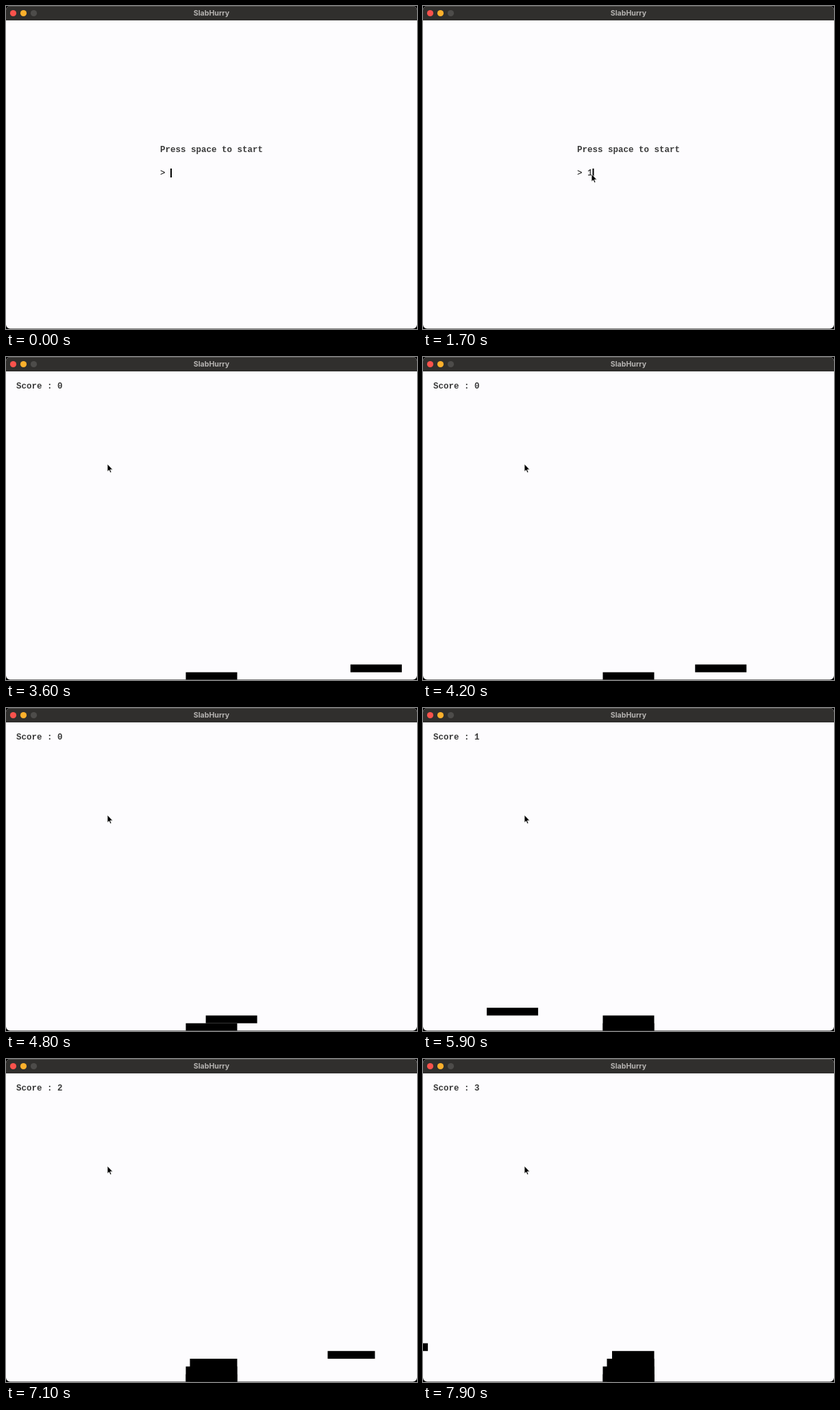
Animation, 600 px wide and 471 px high, one loop 8 s. Source, as an HTML page:

```html
<!DOCTYPE html>
<html lang="en">
<head>
<meta charset="utf-8">
<title>SlabHurry</title>
<style>
  html, body { margin: 0; width: 100%; height: 100%; overflow: hidden; background: #000; }
  svg { display: block; width: 600px; height: 471px; }
  text { white-space: pre; }
  .mono { font: 12.5px "Liberation Mono", "Courier New", monospace; }
  .bold { font-weight: 700; fill: #3a3a3a; }
  .title { font: 700 10.6px Inter, Roboto, sans-serif; fill: #b5b3b1; text-anchor: middle; }
</style>
</head>
<body>
<svg viewBox="0 0 600 471">
  <clipPath id="win"><rect width="600" height="470.6" rx="6"/></clipPath>
  <g clip-path="url(#win)">
    <rect width="600" height="471" fill="#fdfcfe"/>
    <g id="menu" class="mono">
      <text class="bold" x="225" y="213">Press space to start</text>
      <text id="prompt" x="225" y="247"></text>
      <rect id="caret" y="237" width="2" height="13"/>
    </g>
    <g id="game">
      <text id="score" class="mono bold" x="15" y="46"></text>
      <g id="blocks"></g>
    </g>
    <rect width="600" height="21" fill="#302f2d"/>
    <rect width="600" height="1" fill="#555452"/>
    <circle cx="10.5" cy="10.5" r="4.6" fill="#f9524c"/>
    <circle cx="25.5" cy="10.5" r="4.6" fill="#fbb02c"/>
    <circle cx="40.5" cy="10.5" r="4.6" fill="#4d4c4a"/>
    <text class="title" x="300" y="13.8">SlabHurry</text>
  </g>
  <path id="pointer" d="M0 0V11.2L2.5 8.9L4.2 12.8L6 12L4.3 8.2H7.8Z" stroke="#fff" stroke-width=".8"/>
</svg>
<script>
const $ = id => document.getElementById(id);
const LOOP = 8000, STEP = 100, GAME = 3100;
const FLOOR = 471, ROW = 11.3, RIGHT = 337.5;

// A block lands when the next one sets off; what overhangs the tower is cut away.
const starts = [3048, 4945, 6605, 7873];
const lefts = [262.5, 262.5, 268.5, 276];

// Distance covered by time t: the game speeds up at 6 s.
const travel = t => .176 * t + .0875 * Math.max(0, t - 6000);

function curve(t, from, to, a, b, c) {
  const u = Math.min(1, Math.max(0, (t - from) / (to - from)));
  return a.map((v, i) => v * (1 - u) ** 2 + 2 * b[i] * u * (1 - u) + c[i] * u ** 2);
}

const pointerAt = t => t < 1700
  ? curve(t, 100, 600, [290, 386], [268, 310], [246, 245])
  : curve(t, 1700, 2500, [246, 245], [340, 220], [148, 156]);

const show = (el, on) => el.setAttribute("visibility", on ? "visible" : "hidden");

function place(rect, x, width, height) {
  for (const [key, value] of Object.entries({ x, width, height })) rect.setAttribute(key, value);
}

function addRow(row) {
  const rect = document.createElementNS("http://www.w3.org/2000/svg", "rect");
  rect.setAttribute("y", FLOOR - ROW * (row + 1));
  return $("blocks").appendChild(rect);
}

place(addRow(0), lefts[0], RIGHT - lefts[0], ROW);
const blocks = starts.map((_, i) => addRow(i + 1));

function drawBlock(rect, i, t) {
  const width = RIGHT - lefts[i], moved = travel(t) - travel(starts[i]);
  show(rect, t >= GAME && t >= starts[i]);
  if (t >= starts[i + 1]) {
    // A landed block reaches the floor, so the tower has no seams.
    place(rect, lefts[i + 1], RIGHT - lefts[i + 1], ROW * (i + 2));
  } else {
    place(rect, i % 2 ? moved - width : 600 - moved, width, ROW);
  }
}

function draw(now) {
  const t = Math.floor(now % LOOP / STEP) * STEP;
  show($("menu"), t < GAME);
  show($("game"), t >= GAME);

  const typed = t >= 1300;
  $("prompt").textContent = typed ? "> 1" : "> ";
  $("caret").setAttribute("x", typed ? 247.5 : 240);

  // The pointer hides after a key press until it moves again.
  show($("pointer"), t >= 100 && (t < 1400 || t >= 1700));
  $("pointer").setAttribute("transform", `translate(${pointerAt(t)})`);

  $("score").textContent = "Score : " + starts.slice(1).filter(s => t >= s).length;
  blocks.forEach((rect, i) => drawBlock(rect, i, t));
}

let start;
function tick(now) {
  start ??= now;
  draw(now - start);
  requestAnimationFrame(tick);
}
draw(0);
requestAnimationFrame(tick);
</script>
</body>
</html>
```
